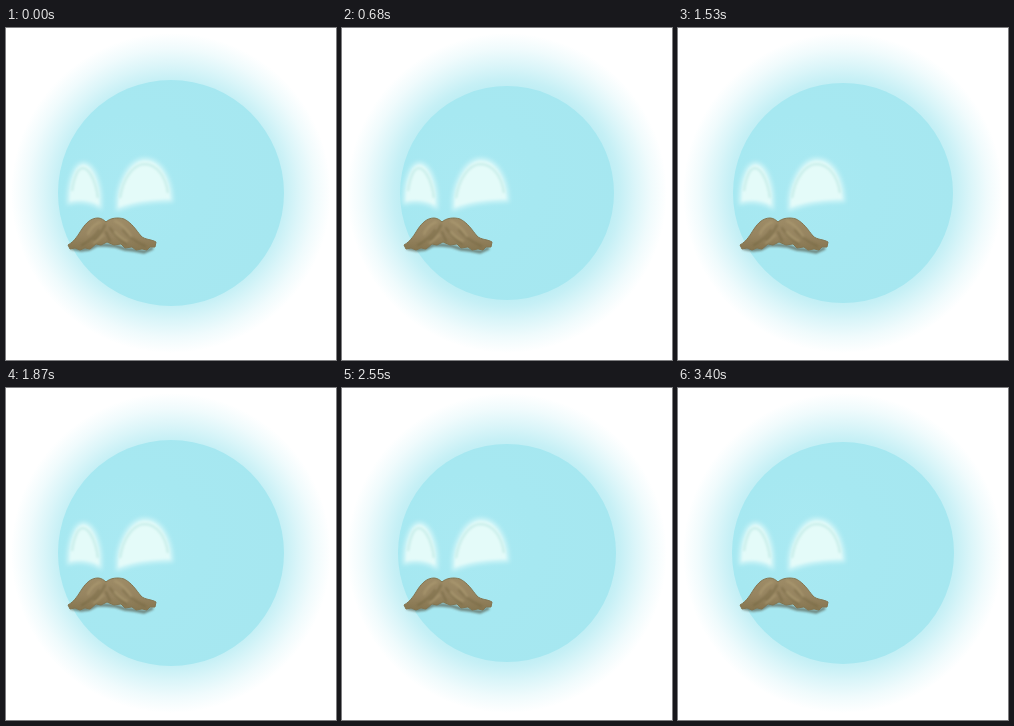
These frames come from a looping animation (330x332 px, 3.57 s). An HTML page:

```html
<!DOCTYPE html>
<html lang="en">
<head>
<meta charset="utf-8">
<title>Glowing face</title>
<style>
  html, body { margin: 0; width: 100%; height: 100%; overflow: hidden; background: #fff; }
  svg { display: block; width: 330px; height: 332px; }
</style>
</head>
<body>
<svg viewBox="0 0 330 332">
  <defs>
    <radialGradient id="halo" gradientUnits="userSpaceOnUse" cx="165" cy="165" r="160">
      <stop offset=".65" stop-color="#a5e7f0" stop-opacity=".74"/>
      <stop offset=".71" stop-color="#a5e7f0" stop-opacity=".63"/>
      <stop offset=".8" stop-color="#a5e7f0" stop-opacity=".4"/>
      <stop offset=".9" stop-color="#a5e7f0" stop-opacity=".17"/>
      <stop offset="1" stop-color="#a5e7f0" stop-opacity="0"/>
    </radialGradient>
    <radialGradient id="body" gradientUnits="userSpaceOnUse" cx="122" cy="155" r="160">
      <stop offset="0" stop-color="#a9e9f2"/>
      <stop offset=".45" stop-color="#a6e8f1"/>
      <stop offset="1" stop-color="#a6e7f0"/>
    </radialGradient>
    <linearGradient id="hair" x1="0" y1="0" x2="0" y2="1">
      <stop offset="0" stop-color="#9d8b66"/>
      <stop offset=".55" stop-color="#968460"/>
      <stop offset="1" stop-color="#85754f"/>
    </linearGradient>
    <filter id="glow" x="-40%" y="-60%" width="180%" height="220%"><feGaussianBlur stdDeviation="2.2"/></filter>
    <filter id="soft" x="-30%" y="-60%" width="160%" height="220%"><feGaussianBlur stdDeviation="1.2"/></filter>
    <path id="left" d="M64 173C64 157 69 138 77 137C87 137 94 159 93 177C84 172 74 171 64 173Z"/>
    <path id="right" d="M113 179C112 160 123 134 138 133C153 132 163 150 164 171C148 171 128 173 113 179Z"/>
  </defs>

  <circle cx="165" cy="165" r="160" fill="url(#halo)"/>
  <circle id="disc" cx="165" cy="165" r="113" fill="url(#body)"/>

  <g id="open">
    <g fill="#d3f6f8" stroke="#d3f6f8" stroke-width="6" filter="url(#glow)">
      <use href="#left"/><use href="#right"/>
    </g>
    <g fill="#e4fbf9" filter="url(#soft)">
      <use href="#left"/><use href="#right"/>
    </g>
    <g fill="none" stroke="#cbefeb" stroke-width="2.6" filter="url(#soft)">
      <path d="M66 163C68 149 72 140 77 140C84 141 90 154 92 170"/>
      <path d="M114 170C117 150 127 137 138 136C151 136 160 149 162 165"/>
    </g>
  </g>

  <g id="shut" fill="none" stroke="#c9f2f6" stroke-linecap="round">
    <g stroke-width="10" filter="url(#glow)">
      <path d="M66 170Q78 173 89 176"/><path d="M115 178Q140 176 162 171"/>
    </g>
    <g stroke="#d3f5f7" stroke-width="3" filter="url(#soft)">
      <path d="M67 170Q78 174 89 176"/><path d="M116 178Q140 177 161 171"/>
    </g>
  </g>

  <path d="M65 220L75 222L83 221L91 217L100 217L110 218L119 221L128 222L138 224L147 220" fill="none" stroke="#586052" stroke-width="3.5" opacity=".7" filter="url(#soft)"/>
  <path d="M62 217C69 213 72 207 76 201C80 195 85 190 92 190C95 190 98 192 100 194C104 190 112 189 118 191C126 195 130 202 135 208C139 212 145 211 150 214L149 219L144 219L141 222L136 221L130 222L126 219L119 220L115 216L108 217L101 214L95 217L90 216L84 221L79 220L74 222L69 220L64 221Z" fill="url(#hair)" stroke="#827450" stroke-linejoin="round"/>
  <g fill="none" stroke-linecap="round" stroke-width="2" opacity=".6" filter="url(#soft)">
    <path stroke="#726540" d="M99 197Q95 206 88 212M93 202Q86 212 76 217M104 200Q110 209 120 216M117 202Q124 211 139 218M100 204L104 213"/>
    <path stroke="#b3a277" d="M94 194Q86 197 82 206M109 193Q118 197 125 208M109 204Q114 210 121 213M97 207Q93 212 88 215"/>
  </g>
</svg>
<script>
  const STEP = 170;
  const radii = [113, 111.8, 110.2, 108.5, 107, 106.2, 106, 106.5, 108, 110, 112,
                 113, 112.3, 111.3, 110, 109, 108.2, 107.7, 108, 109.3, 111];
  const lids = { 6: 0.5, 7: 0, 8: 0.5 };
  const BASE = 175;
  const [disc, open, shut] = ["disc", "open", "shut"].map(id => document.getElementById(id));

  function draw() {
    const step = Math.floor(performance.now() / STEP) % radii.length;
    const lift = lids[step] ?? 1;
    disc.setAttribute("r", radii[step]);
    open.setAttribute("transform", `translate(0 ${BASE * (1 - lift)}) scale(1 ${lift || 1})`);
    open.style.display = lift ? "" : "none";
    shut.style.display = lift ? "none" : "";
    requestAnimationFrame(draw);
  }
  draw();
</script>
</body>
</html>
```
